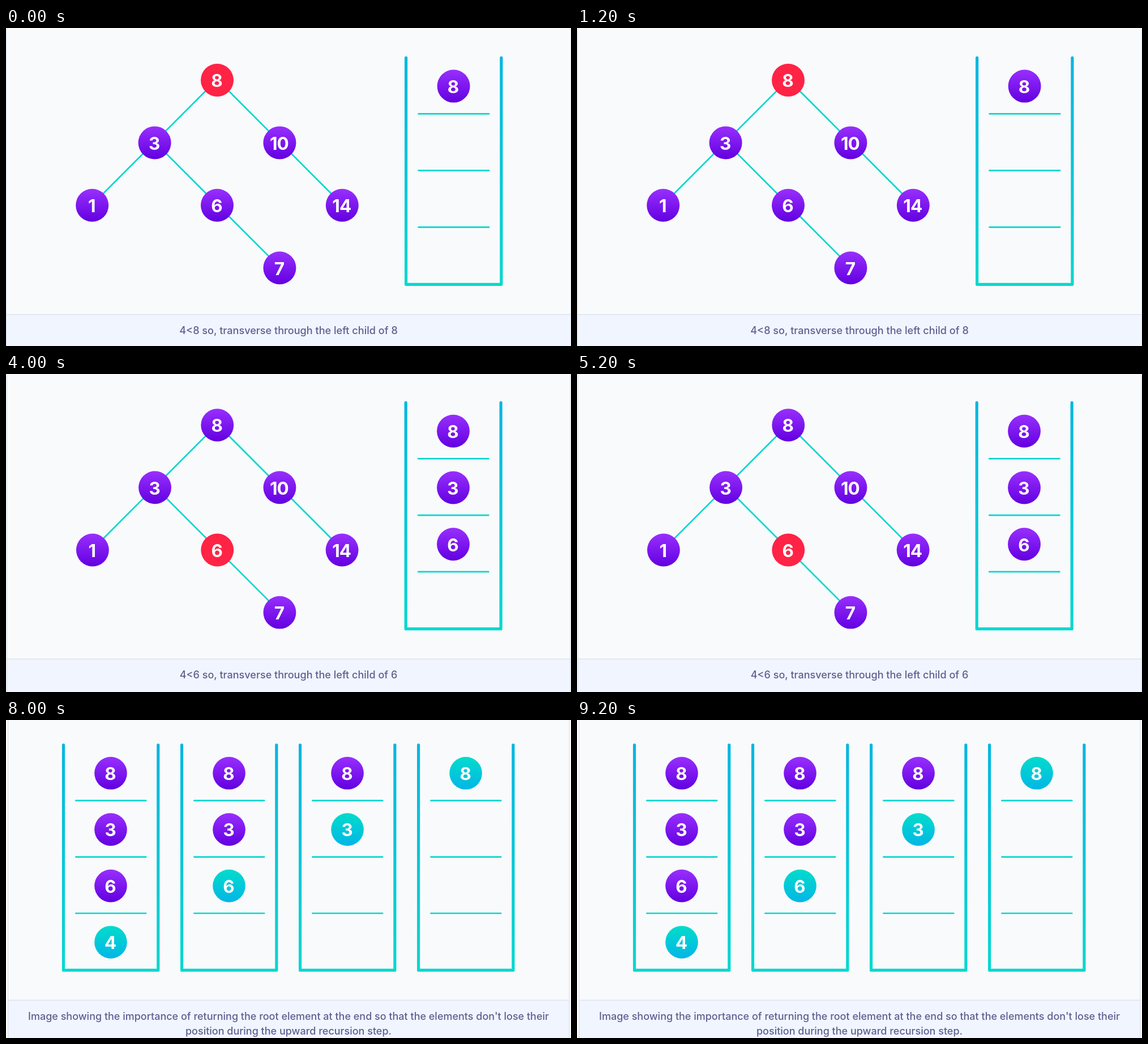
These frames come from a looping animation (998x561 px, 10000 ms). An HTML page:

```html
<!DOCTYPE html>
<html lang="en">
<head>
<meta charset="utf-8">
<title>Inserting into a binary search tree</title>
<style>
  html, body { margin: 0; width: 100%; height: 100%; overflow: hidden; background: #fff; }
  svg { display: block; width: 998px; height: 561px; }
  text { font-family: Inter, "Open Sans", sans-serif; text-anchor: middle; }
  .key { font-size: 31.5px; font-weight: 700; letter-spacing: -1px; fill: #fff; }
  .caption { font-size: 18.1px; font-weight: 500; fill: #5f5f90; }
  .edge { stroke: #08d6cd; stroke-width: 2.7; stroke-linecap: round; }
  .bin { fill: none; stroke: url(#bin); stroke-width: 5.2; stroke-linecap: round; stroke-linejoin: round; }
</style>
</head>
<body>
<svg viewBox="0 0 998 561">
  <defs>
    <linearGradient id="purple" x2="0" y2="1">
      <stop stop-color="#982ffd"/><stop offset="1" stop-color="#6200e0"/>
    </linearGradient>
    <linearGradient id="teal" x2="0" y2="1">
      <stop stop-color="#02dccb"/><stop offset="1" stop-color="#02b6e6"/>
    </linearGradient>
    <linearGradient id="bin" x2="0" y2="1">
      <stop stop-color="#04b6e0"/><stop offset="1" stop-color="#05d8cf"/>
    </linearGradient>
  </defs>
  <g id="stage"></g>
</svg>
<script>
const STEP = 2000;
const FILL = { purple: 'url(#purple)', teal: 'url(#teal)', red: '#ff2345' };
const ROOT = { x: 373, y: 92 }, GAP = 110.4, EDGE_LIFT = 1.3;

// Tree nodes: key -> [column, row, parent]
const TREE = {
  8: [0, 0], 3: [-1, 1, 8], 10: [1, 1, 8], 1: [-2, 2, 3],
  6: [0, 2, 3], 14: [2, 2, 10], 7: [1, 3, 6], 4: [-1, 3, 6]
};
const PATH = [8, 3, 6, 4];

const line = (x1, y1, x2, y2) =>
  `<line class="edge" x1="${x1}" y1="${y1}" x2="${x2}" y2="${y2}"/>`;

const node = (x, y, key, color = 'purple') =>
  `<circle cx="${x}" cy="${y}" r="29" fill="${FILL[color]}"/>
   <text class="key" x="${x - 1}" y="${y + 12.3}">${key}</text>`;

function tree(keys, marked, color) {
  const at = (key, lift = 0) =>
    [ROOT.x + TREE[key][0] * GAP, ROOT.y + TREE[key][1] * GAP - lift];
  const edges = keys.filter(k => TREE[k][2])
    .map(k => line(...at(TREE[k][2], EDGE_LIFT), ...at(k, EDGE_LIFT)));
  const nodes = keys.map(k => node(...at(k), k, k === marked ? color : 'purple'));
  return edges.join('') + nodes.join('');
}

function stack(x, count, topColor = 'purple') {
  let out = `<path class="bin" d="M${x - 84} 52.5V452.3H${x + 84.3}V52.5"/>`;
  for (let y = 151.3; y < 400; y += 100) out += line(x - 62, y, x + 62.5, y);
  PATH.slice(0, count).forEach((key, i) => {
    out += node(x, 102.6 + i * 100, key, i === count - 1 ? topColor : 'purple');
  });
  return out;
}

function scene(body, captions, scale = 1, dy = 0) {
  const text = captions.map((c, i) =>
    `<text class="caption" x="499" y="${540.2 + i * 26.2}">${c}</text>`).join('');
  return `<g transform="translate(499 ${dy}) scale(${scale}) translate(-499 0)">
    <rect x=".5" y="-.5" width="997.5" height="640" rx="5" fill="#f9fafc"/>
    <rect x=".5" y="505.5" width="997.5" height="140" fill="#f0f5ff"/>
    <path d="M.5 505.5H998" stroke="#d3dce6"/>
    <rect x=".5" y="-.5" width="997.5" height="640" rx="5" fill="none" stroke="#d3dce6"/>
    ${body}${text}</g>`;
}

const BEFORE = [8, 3, 10, 1, 6, 14, 7], AFTER = [...BEFORE, 4];
const BIN_X = 790.6;

const scenes = [
  scene(tree(BEFORE, 8, 'red') + stack(BIN_X, 1),
    ['4&lt;8 so, transverse through the left child of 8']),
  scene(tree(BEFORE, 3, 'red') + stack(BIN_X, 2),
    ['4&gt;3 so, transverse through the right child of 8']),
  scene(tree(BEFORE, 6, 'red') + stack(BIN_X, 3),
    ['4&lt;6 so, transverse through the left child of 6'], 0.998, -1.7),
  scene(tree(AFTER, 4, 'teal') + stack(BIN_X, 4),
    ['Insert 4 as a left child of 6'], 0.998, -1.7),
  scene([4, 3, 2, 1].map((n, i) => stack(183.1 + i * 210.3, n, 'teal')).join(''),
    ["Image showing the importance of returning the root element at the end so that the elements don't lose their",
     'position during the upward recursion step.'], 0.994, -8.2)
];

const stage = document.getElementById('stage');
stage.innerHTML = scenes.join('');
const groups = [...stage.children];
const start = performance.now();

function draw(now) {
  const current = Math.floor(Math.max(0, now - start) / STEP) % groups.length;
  groups.forEach((g, i) => { g.style.display = i === current ? '' : 'none'; });
  requestAnimationFrame(draw);
}
draw(start);
</script>
</body>
</html>
```
